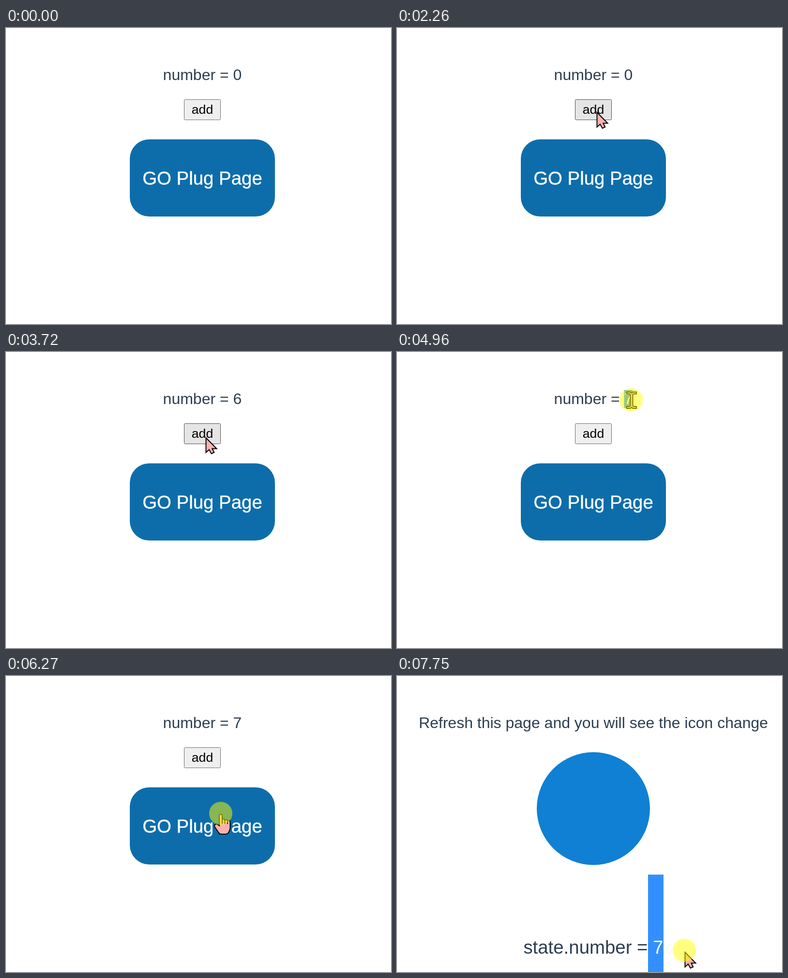
Write an HTML page that moves like this. It is 796x614 px and loops after 8000 ms.

```html
<!DOCTYPE html>
<html lang="en">
<head>
<meta charset="utf-8">
<title>Counter demo</title>
<style>
  html, body { margin: 0; width: 100%; height: 100%; overflow: hidden; background: #fff; }
  svg { display: block; width: 796px; height: 614px; }
  text { font: 32px "Liberation Sans", Arial, sans-serif; fill: #2c3e50; }
  .big { font-size: 38.4px; }
  .small { font-size: 26.67px; fill: #000; }
  .link { fill: #fff; stroke: #fff; stroke-width: .4; }
  .mark { fill: #338fff; }
  .picked { fill: #fff; }
  #button { fill: #efefef; stroke: #6b6b6b; }
  #button.hover { fill: #e5e5e5; stroke: #4f4f4f; }
  #button.hover.down { fill: #f5f5f5; stroke: #8d8d8d; }
  #cursor path { fill: #ffb0b0; stroke: #000; stroke-width: 2; }
</style>
</head>
<body>
<svg viewBox="0 0 796 614">
  <g id="home">
    <rect id="mark" class="mark" x="469.6" y="79" width="17.8" height="37"/>
    <text x="324.6" y="108">number =</text>
    <text id="digit" x="469.6" y="108">0</text>
    <rect id="button" x="368.5" y="148.5" width="75" height="42" rx="2"/>
    <text class="small" x="383.8" y="178">add</text>
    <rect x="256" y="231" width="300" height="160" rx="40" fill="#0d6dab"/>
    <text class="big link" x="282.2" y="325">GO Plug Page</text>
  </g>
  <g id="plug">
    <text x="406" y="108" text-anchor="middle">Refresh this page and you will see the icon change</text>
    <circle cx="406" cy="275" r="117" fill="#0f80d4"/>
    <rect id="mark2" class="mark" x="519" y="412" width="32" height="202"/>
    <text class="big" x="261.4" y="576">state.number =</text>
    <text id="digit2" class="big" x="529.3" y="576">7</text>
  </g>
  <g id="cursor">
    <path id="arrow" transform="translate(.5 1)" d="M1 3V33.5L7.5 27.5L12.2 36L17.8 33.2L13.8 25.5H23Z"/>
    <path id="beam" d="M-9 -16H-2L1 -14L4 -16H11V-12H5L3.5 -10V12L5 14H11V18H4L1 16L-2 18H-9V14H-3L-1.5 12V-10L-3 -12H-9Z"/>
    <path id="hand" d="M-3 26V4Q-3 2 0 2Q3 2 3 4V21V14Q3 11 6 11.5Q8.5 12 8.5 15V21V15Q9 12.5 11.5 13Q14 13.5 14 16.5V21V16.5Q14.5 14 17 14.5Q19.5 15 19.5 18V30C19.5 35 17 37 16 40Q14 43 8 43H1Q-3 43 -5 39L-12.5 28Q-14 23 -9.5 22Q-6 22 -3 26Z" stroke-linejoin="round"/>
    <circle id="halo" r="24" fill="#ff0" fill-opacity=".5"/>
  </g>
</svg>
<script>
const LOOP = 8000, ENTER = 500, NAV = 6340;
const STEP = 1000 / 13; // the pointer is redrawn 13 times a second
const $ = id => document.getElementById(id);

// pointer strokes: start, end, route; the pointer rests in between
const moves = [
  [500, 970, "M635 574L555 499"],
  [1200, 1960, "M549 511Q200 250 285 195T412 171"],
  [2270, 2570, "M412 171V174"],
  [4120, 4650, "M412 174Q430 105 470 99"],
  [4880, 4960, "M470 99H484"],
  [5040, 5580, "M484 99Q515 120 527 164"],
  [5800, 6190, "M527 164L444 285"],
  [6660, 7350, "M444 285L397 223Q430 400 510 569"],
  [7520, 7750, "M510 569H594"]
].map(([from, to, d]) => {
  const route = document.createElementNS("http://www.w3.org/2000/svg", "path");
  route.setAttribute("d", d);
  return { from, to, route, steps: Math.max(1, Math.round((to - from) / STEP)) };
});

// six even clicks on the button, then a late one
const adds = Array.from({ length: 6 }, (_, i) => [2480 + 230 * i, 2570 + 230 * i]);
adds.push([4040, 4120]);
const select = [4730, 5040], clear = [5580, 5650], open = [6260, NAV], drag = [7520, LOOP];
const presses = [...adds, select, clear, open, drag];

const ease = k => k * k * (3 - 2 * k);

function locate(t) {
  const m = moves.filter(v => v.from <= t).pop() || moves[0];
  const k = Math.max(0, Math.min(1, (t - m.from) / (m.to - m.from)));
  const part = Math.floor(k * m.steps + .1) / m.steps;
  return m.route.getPointAtLength(ease(part) * m.route.getTotalLength());
}

const show = (id, on) => $(id).setAttribute("visibility", on ? "visible" : "hidden");

function draw(t) {
  const { x, y } = locate(t);
  const inside = (l, top, r, b) => x >= l && x <= r && y >= top && y <= b;
  const home = t < NAV, visible = t >= ENTER;
  const down = presses.some(([a, b]) => t >= a && t < b);

  show("home", home);
  show("plug", !home);

  $("button").classList.toggle("hover", visible && inside(368, 148, 444, 191));
  $("button").classList.toggle("down", down);
  $("digit").textContent = adds.filter(p => p[1] <= t).length;

  // a digit is selected once the drag passes its middle
  const picked = t >= select[0] && t < clear[0] && x > 478;
  show("mark", home && picked);
  $("digit").classList.toggle("picked", picked);
  const picked2 = t >= drag[0] && x > 540;
  show("mark2", picked2);
  $("digit2").classList.toggle("picked", picked2);

  const text = home ? inside(324, 79, 488, 116) : inside(261, 540, 551, 590);
  const link = home && inside(256, 231, 556, 391);
  show("beam", visible && text);
  show("hand", visible && link);
  show("arrow", visible && !text && !link);
  show("halo", down);
  $("cursor").setAttribute("transform", `translate(${Math.round(x)} ${Math.round(y)})`);
}

const start = performance.now();
function frame(now) {
  draw(Math.max(0, now - start) % LOOP);
  requestAnimationFrame(frame);
}
draw(0);
requestAnimationFrame(frame);
</script>
</body>
</html>
```
